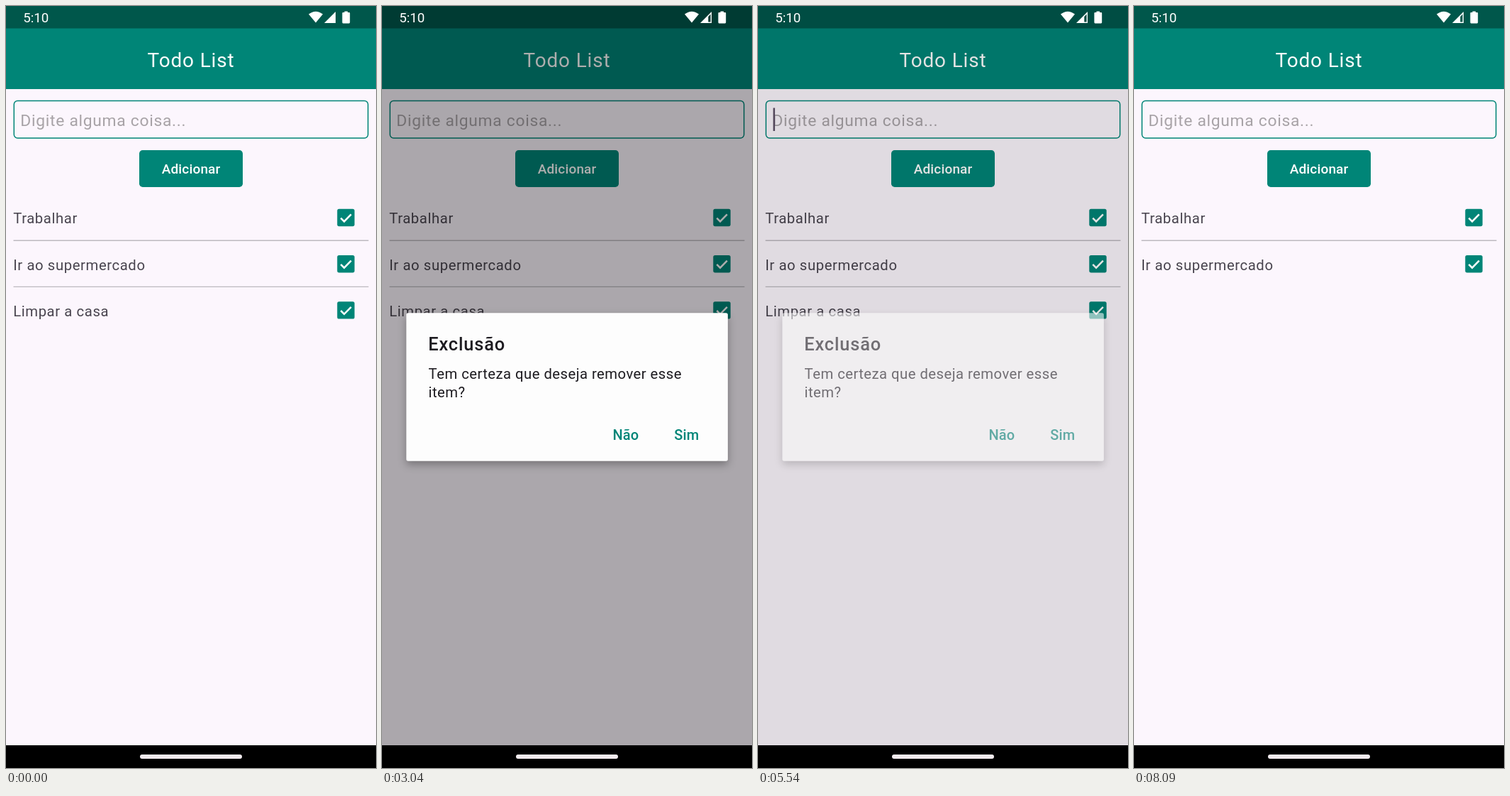
An HTML page that plays this animation: 522x1073 px, repeating every 8140 ms.

```html
<!DOCTYPE html>
<html lang="pt">
<head>
<meta charset="utf-8">
<title>Todo List</title>
<style>
  html, body { margin: 0; width: 100%; height: 100%; overflow: hidden; background: #fcf6fd; }
  svg { display: block; width: 522px; height: 1073px; font-family: Roboto, sans-serif; }
  .teal { fill: #008577; }
  .white { fill: #fff; }
  .body { font-size: 20.3px; letter-spacing: .6px; fill: #49454f; }
  .msg { font-size: 20.3px; letter-spacing: .46px; fill: #1d1b20; }
  .medium { font-weight: 500; }
  .mid { text-anchor: middle; }
  #card { filter: drop-shadow(0 5px 6px rgba(0, 0, 0, .3)); }
</style>
</head>
<body>
<svg viewBox="0 0 522 1073">
  <defs>
    <g id="check">
      <rect x="467.3" y="-12.2" width="24.4" height="24.4" rx="2.6" class="teal"/>
      <path d="M472.3 .6l4.8 4.8 9.8-10" fill="none" stroke="#fff" stroke-width="2.5"/>
    </g>
  </defs>

  <rect width="522" height="1073" fill="#fcf6fd"/>
  <rect width="522" height="117" class="teal"/>
  <rect width="522" height="31.5" fill="#00574b"/>
  <text x="261" y="86" class="white mid" font-size="27.9" letter-spacing=".87">Todo List</text>

  <rect x="11.3" y="133.6" width="499.4" height="52.4" rx="5" fill="none" stroke="#008577" stroke-width="1.5"/>
  <text x="20.3" y="169" font-size="22.84" letter-spacing=".71" fill="#a8a3a7">Digite alguma coisa...</text>
  <rect id="caret" x="21.4" y="143.5" width="2.5" height="32.5" fill="#5d4f66"/>

  <rect x="188" y="203" width="146" height="52" rx="4.8" class="teal"/>
  <text x="261" y="236.4" class="white mid medium" font-size="19.03" letter-spacing=".14">Adicionar</text>

  <g id="rows"></g>

  <rect id="dim" width="522" height="1041" fill="#000"/>

  <g id="card">
    <rect x="34.3" y="432.3" width="453.6" height="208.4" rx="2.6" fill="#fdfdfd"/>
    <text x="65.2" y="484.7" class="medium" font-size="25.4" letter-spacing=".85" fill="#1d1b20">Exclusão</text>
    <text x="65.6" y="525.4" class="msg">Tem certeza que deseja remover esse</text>
    <text x="65.6" y="550.6" class="msg">item?</text>
    <g class="teal medium" font-size="20" letter-spacing=".2">
      <text x="325.4" y="611">Não</text>
      <text x="412.2" y="611">Sim</text>
    </g>
  </g>

  <g class="white">
    <text x="24.2" y="23.2" font-size="18.8">5:10</text>
    <path d="M437 23.6L427 11.6Q437 4 447 11.6Z"/>
    <path id="full" d="M449 24L465 8V24Z"/>
    <path id="weak" fill-rule="evenodd" d="M449 24L465 8V24ZM460.3 15V22.6H463.6V11.6Z"/>
    <path d="M477.5 9V7.4H482V9H484Q485.2 9 485.2 10.2V23Q485.2 24.4 484 24.4H475.6Q474.4 24.4 474.4 23V10.2Q474.4 9 475.6 9Z"/>
  </g>

  <rect y="1041" width="522" height="32" fill="#000"/>
  <rect x="189" y="1054" width="144" height="6" rx="3" fill="#f2ebee"/>
</svg>
<script>
  const LOOP = 8140, FADE = 150, DIM = 0.32, BLINK = 500;
  const dialogs = [[1613, 4243], [5490, 7250]];
  const REMOVED = 7270, WEAK = 3000;
  const focusSpans = [[4310, 5490], [7270, LOOP]];

  const $ = id => document.getElementById(id);
  const clamp = x => Math.min(1, Math.max(0, x));
  const show = (el, on) => el.setAttribute('visibility', on ? 'visible' : 'hidden');
  const within = (t, [a, b]) => t >= a && t < b;

  $('rows').innerHTML = ['Trabalhar', 'Ir ao supermercado', 'Limpar a casa'].map((name, i) => {
    const y = 298 + i * 65.2;
    const line = i ? `<path d="M10.5 ${y - 33}H511.5" stroke="#bdb9bf" stroke-width="1.4"/>` : '';
    return `<g>${line}<text x="10.2" y="${y + 8.4}" class="body">${name}</text>` +
      `<use href="#check" y="${y}"/></g>`;
  }).join('');
  const lastRow = $('rows').lastElementChild;

  function caretOn(t) {
    const span = focusSpans.find(s => within(t, s));
    if (span) return (t - span[0]) % (2 * BLINK) < BLINK;
    return within(t, [dialogs[1][0], focusSpans[1][0]]);
  }

  function draw(t) {
    let card = 0, dim = 0;
    for (const [open, close] of dialogs) {
      const enter = clamp((t - open) / FADE), leave = clamp((t - close) / FADE);
      card += (1 - (1 - enter) ** 2) * (1 - leave) ** 2;
      dim += enter * (1 - leave);
    }
    $('card').style.opacity = card;
    $('dim').style.opacity = dim * DIM;
    show($('card'), card > 0);
    show($('caret'), caretOn(t));
    show($('full'), t < WEAK);
    show($('weak'), t >= WEAK);
    show(lastRow, t < REMOVED);
  }

  const start = performance.now();
  function tick() {
    draw((performance.now() - start) % LOOP);
    requestAnimationFrame(tick);
  }
  tick();
</script>
</body>
</html>
```
